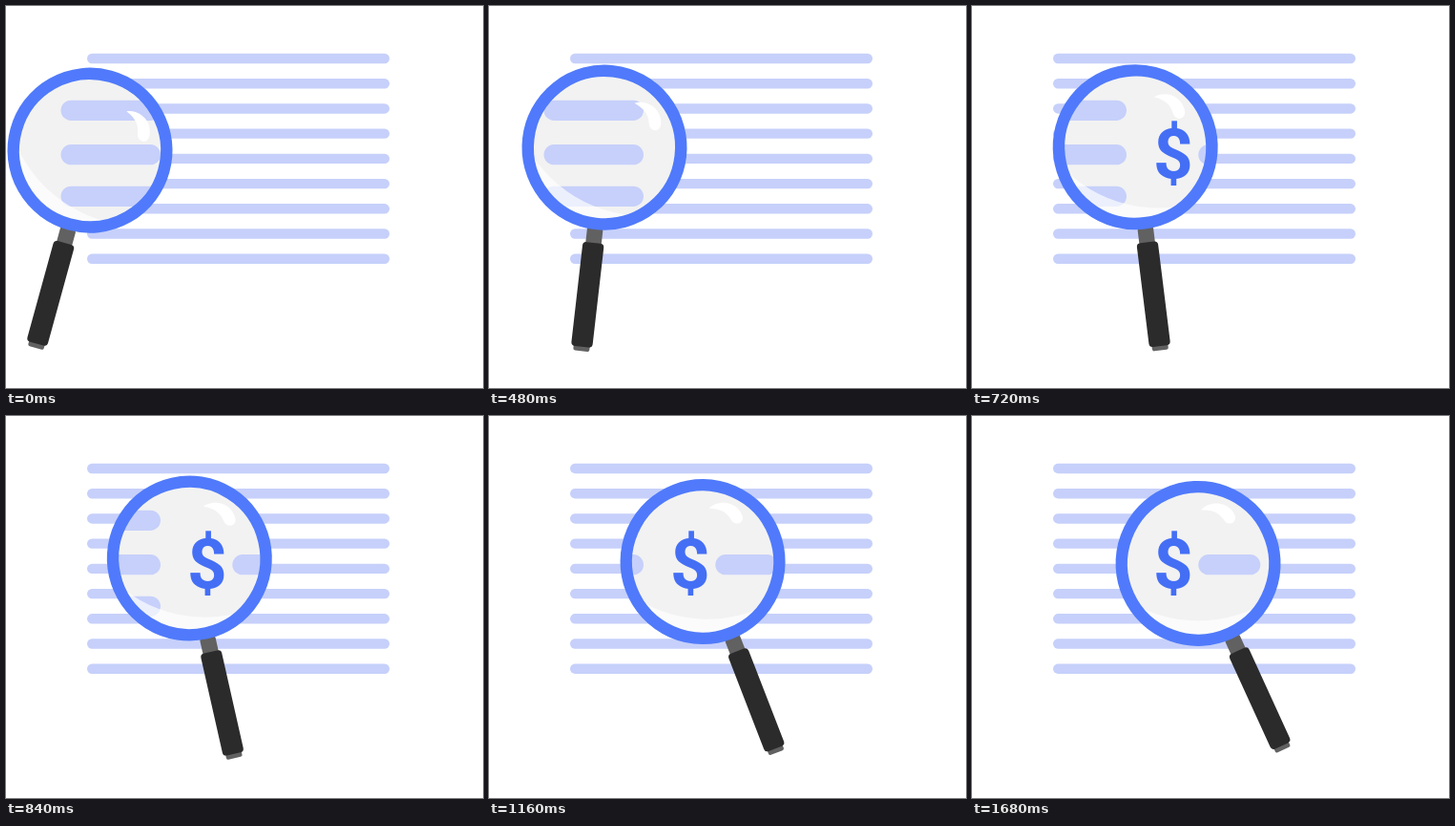
An HTML page for the animation above (3 s loop, 500 by 400 pixels).

```html
<!DOCTYPE html>
<html lang="en">
<head>
<meta charset="utf-8">
<title>Search loop</title>
<style>
  html, body { margin: 0; width: 100%; height: 100%; overflow: hidden; background: #fff; }
  svg { display: block; width: 500px; height: 400px; }
  .bar { fill: #c6d0fa; }
  #sign { font-family: Roboto, Arial, sans-serif; font-weight: 700; fill: #446ff5; text-anchor: middle; }
</style>
</head>
<body>
<svg viewBox="0 0 500 400">
  <defs>
    <clipPath id="lens"><circle id="hole" r="76"/></clipPath>
    <clipPath id="inner"><circle r="76"/></clipPath>
  </defs>
  <g id="lines"></g>
  <g clip-path="url(#lens)">
    <rect width="500" height="400" fill="#f2f2f2"/>
    <g id="zoomed"></g>
    <text id="sign">$</text>
  </g>
  <g id="glass">
    <!-- reflections, tilted against the handle -->
    <g transform="rotate(24.6)">
      <path clip-path="url(#inner)" fill="#fff" fill-opacity=".68"
        d="M-80 34.9A140 140 0 0 0 80 34.9V90H-80Z"/>
      <path fill="#fff"
        d="M3 -56C10 -64 24 -66 33 -58C37 -54.500 39.500 -50 39 -47C38 -41 30.500 -40.500 27.500 -45C23 -51.500 18 -56.500 3 -56Z"/>
    </g>
    <rect x="-8.300" y="85" width="16.600" height="18" rx="2" fill="#616161"/>
    <rect x="-8.500" y="205" width="17" height="9.500" rx="2" fill="#616161"/>
    <rect x="-11.200" y="100.500" width="22.400" height="109.500" rx="4" fill="#2b2b2b"/>
    <circle r="80.250" fill="none" stroke="#507afb" stroke-width="12.500"/>
  </g>
</svg>
<script>
const LOOP = 3000, MOVE = 1680, STEP = 40, ARM = 90;
const $ = id => document.getElementById(id);
const mix = (a, b, p) => a + (b - a) * p;

function addBar(parent, x1, x2, cy, h) {
  const bar = document.createElementNS('http://www.w3.org/2000/svg', 'rect');
  const attrs = { class: 'bar', x: x1, y: cy - h / 2, width: x2 - x1, height: h, rx: h / 2 };
  for (const key in attrs) bar.setAttribute(key, attrs[key]);
  parent.append(bar);
}

for (let i = 0; i < 9; i++) addBar($('lines'), 85, 402, 55 + i * 26.22, 10.4);
for (const y of [109.3, 155.7, 199.3]) addBar($('zoomed'), 57.5, 162, y, 21.3);
addBar($('zoomed'), 237.3, 302.3, 155.7, 21.3);

// Size the sign so that its ink spans the given height.
function fitSign(cx, top, bottom) {
  const pen = document.createElement('canvas').getContext('2d');
  pen.font = '700 200px Roboto, Arial, sans-serif';
  pen.textAlign = 'center';
  const m = pen.measureText('$');
  const k = (bottom - top) / (m.actualBoundingBoxAscent + m.actualBoundingBoxDescent);
  const shift = (m.actualBoundingBoxRight - m.actualBoundingBoxLeft) / 2;
  const sign = $('sign');
  sign.setAttribute('font-size', 200 * k);
  sign.setAttribute('x', cx - shift * k);
  sign.setAttribute('y', top + m.actualBoundingBoxAscent * k);
}
fitSign(210.8, 119.5, 187.5);

// Bezier easing with handles (x1, 0) and (x2, 1).
function ease(x, x1 = 0.46, x2 = 0.28) {
  let lo = 0, hi = 1;
  for (let i = 0; i < 24; i++) {
    const s = (lo + hi) / 2, r = 1 - s;
    if (3 * r * r * s * x1 + 3 * r * s * s * x2 + s ** 3 < x) lo = s; else hi = s;
  }
  return lo * lo * (3 - 2 * lo);
}

function draw(ms) {
  const t = Math.floor((ms % LOOP) / STEP) * STEP;
  const p = t === 0 ? 0 : t >= MOVE ? 1 : ease(t / MOVE);
  const angle = mix(15.4, -24.6, p);
  const rad = angle * Math.PI / 180;
  // The lens swings about a joint that slides along the page.
  const x = mix(64.1, 274.5, p) + ARM * Math.sin(rad);
  const y = mix(237.9, 236.3, p) - ARM * Math.cos(rad);
  $('hole').setAttribute('cx', x);
  $('hole').setAttribute('cy', y);
  $('glass').setAttribute('transform', `translate(${x} ${y}) rotate(${angle})`);
}

const start = performance.now();
function tick() {
  draw(performance.now() - start);
  requestAnimationFrame(tick);
}
tick();
</script>
</body>
</html>
```
